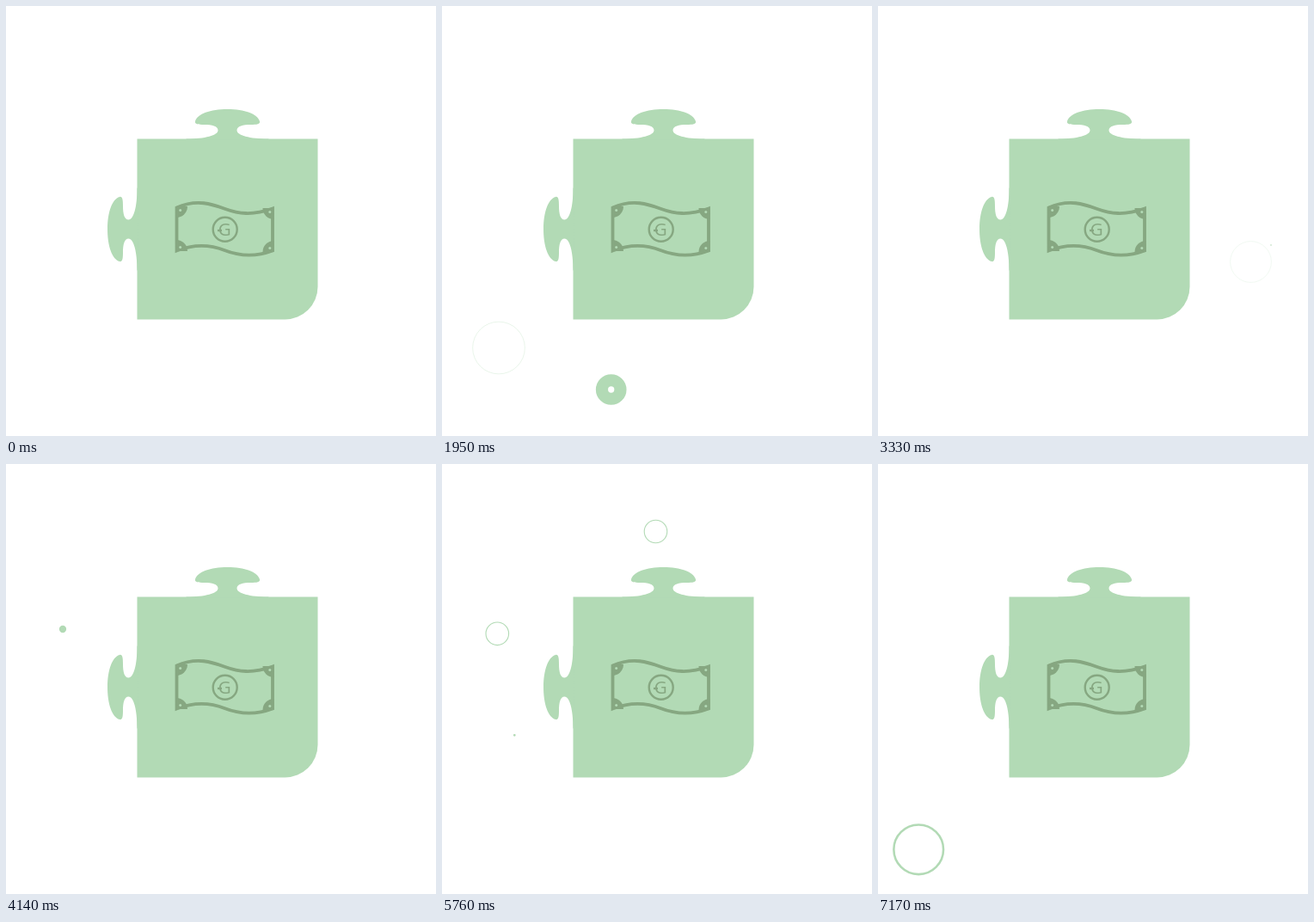
These frames come from a looping animation (500 by 500 pixels, 7.2 s). An HTML page without scripts:

```html
<!DOCTYPE html>
<html lang="en">
<head>
<meta charset="utf-8">
<title>Money puzzle piece</title>
<style>
html, body { margin: 0; width: 100%; height: 100%; overflow: hidden; background: #fff; }
svg { display: block; width: 100vw; height: 100vh; }
.piece { fill: #b2dab5; }
.bill { fill: none; stroke: #86a781; stroke-width: 3.8; }
.ink { fill: #86a781; stroke: none; }
.sign { font: 20.5px "Open Sans", "Noto Sans", sans-serif; text-anchor: middle; }

/* bubbles are unit circles, scaled to their final radius */
.bubbles { fill: none; stroke: #b2dab5; animation: gate 7.2s step-end infinite; }
.bubbles circle {
  r: 0; stroke-width: 0;
  transform: translate(var(--x), var(--y)) scale(var(--r));
  animation: pop 7.2s linear var(--t) infinite;
}
/* clears whatever is still open when the loop restarts */
@keyframes gate {
  0% { visibility: hidden; }
  8% { visibility: visible; }
}
/* a disc swells, then its hole catches up with the rim */
@keyframes pop {
  0% { r: 0px; stroke-width: 0px; }
  .417% { r: .02px; stroke-width: .04px; }
  1.667% { r: .075px; stroke-width: .15px; }
  2.639% { r: .25px; stroke-width: .5px; }
  3.333% { r: .435px; stroke-width: .58px; }
  3.889% { r: .565px; stroke-width: .55px; }
  4.722% { r: .73px; stroke-width: .4px; }
  5.417% { r: .84px; stroke-width: .24px; }
  6.528% { r: .945px; stroke-width: .085px; }
  7.5% { r: .993px; stroke-width: .014px; }
  7.986%, 100% { r: 1px; stroke-width: 0px; }
}
</style>
</head>
<body>
<svg viewBox="0 0 500 500">
  <defs>
    <path id="tab" d="M-48 1V0C-26 0-11-4-11-10C-11-15-18-16.500-27-16.500C-34-16.500-38.500-17-37.500-20.500C-35-29-20-34.500 0-34.500C20-34.500 35-29 37.500-20.500C38.500-17 34-16.500 27-16.500C18-16.500 11-15 11-10C11-4 26 0 48 0V1Z"/>
    <g id="fan">
      <path class="ink" d="M0 0H13A13 13 0 0 1 0 13Z"/>
      <circle cx="4.700" cy="4.500" r="1.500" fill="#b2dab5" stroke="none"/>
    </g>
  </defs>

  <g class="piece">
    <path d="M152.500 154.500H362.500V326.500A38 38 0 0 1 324.500 364.500H152.500Z"/>
    <use href="#tab" transform="translate(257.500 154.500)"/>
    <use href="#tab" transform="translate(152.500 259.500) rotate(-90)"/>
  </g>

  <g class="bill">
    <path d="M198.500 234.500C222 224 240 230.500 255 236S286 244 310 235.500V284.500C286 293.500 268 289.500 254 284S222 275.500 198.500 284.500Z"/>
    <use href="#fan" transform="translate(198 233)"/>
    <use href="#fan" transform="translate(311.500 235) scale(-1 1)"/>
    <use href="#fan" transform="translate(198 285) scale(1 -1)"/>
    <use href="#fan" transform="translate(311.500 286) scale(-1 -1)"/>
    <circle cx="254.700" cy="259.700" r="14" stroke-width="2.400"/>
    <text class="ink sign" x="254.300" y="267">G</text>
    <path d="M246 261H251" stroke-width="2.400"/>
  </g>

  <g class="bubbles">
    <circle style="--x:377px;--y:80.500px;--r:14;--t:.6s"/>
    <circle style="--x:446.700px;--y:55.500px;--r:45.200;--t:.904s"/>
    <circle style="--x:66px;--y:397.500px;--r:30.500;--t:1.4s"/>
    <circle style="--x:196.700px;--y:446px;--r:24.500;--t:1.71s"/>
    <circle style="--x:62px;--y:53px;--r:40;--t:2.37s"/>
    <circle style="--x:433.500px;--y:297.500px;--r:24;--t:2.775s"/>
    <circle style="--x:457px;--y:278px;--r:20;--t:3.3s"/>
    <circle style="--x:300px;--y:460px;--r:24;--t:3.5s"/>
    <circle style="--x:66px;--y:192px;--r:43;--t:4.065s"/>
    <circle style="--x:430.500px;--y:185.500px;--r:30.700;--t:4.49s"/>
    <circle style="--x:160px;--y:57px;--r:34;--t:4.98s"/>
    <circle style="--x:248.500px;--y:78.500px;--r:14;--t:5.285s"/>
    <circle style="--x:64.300px;--y:197.300px;--r:14;--t:5.285s"/>
    <circle style="--x:84.300px;--y:315.300px;--r:34;--t:5.73s"/>
    <circle style="--x:400px;--y:376px;--r:65;--t:6.323s"/>
    <circle style="--x:47.200px;--y:448.300px;--r:30.500;--t:6.7s"/>
  </g>
</svg>
</body>
</html>
```
